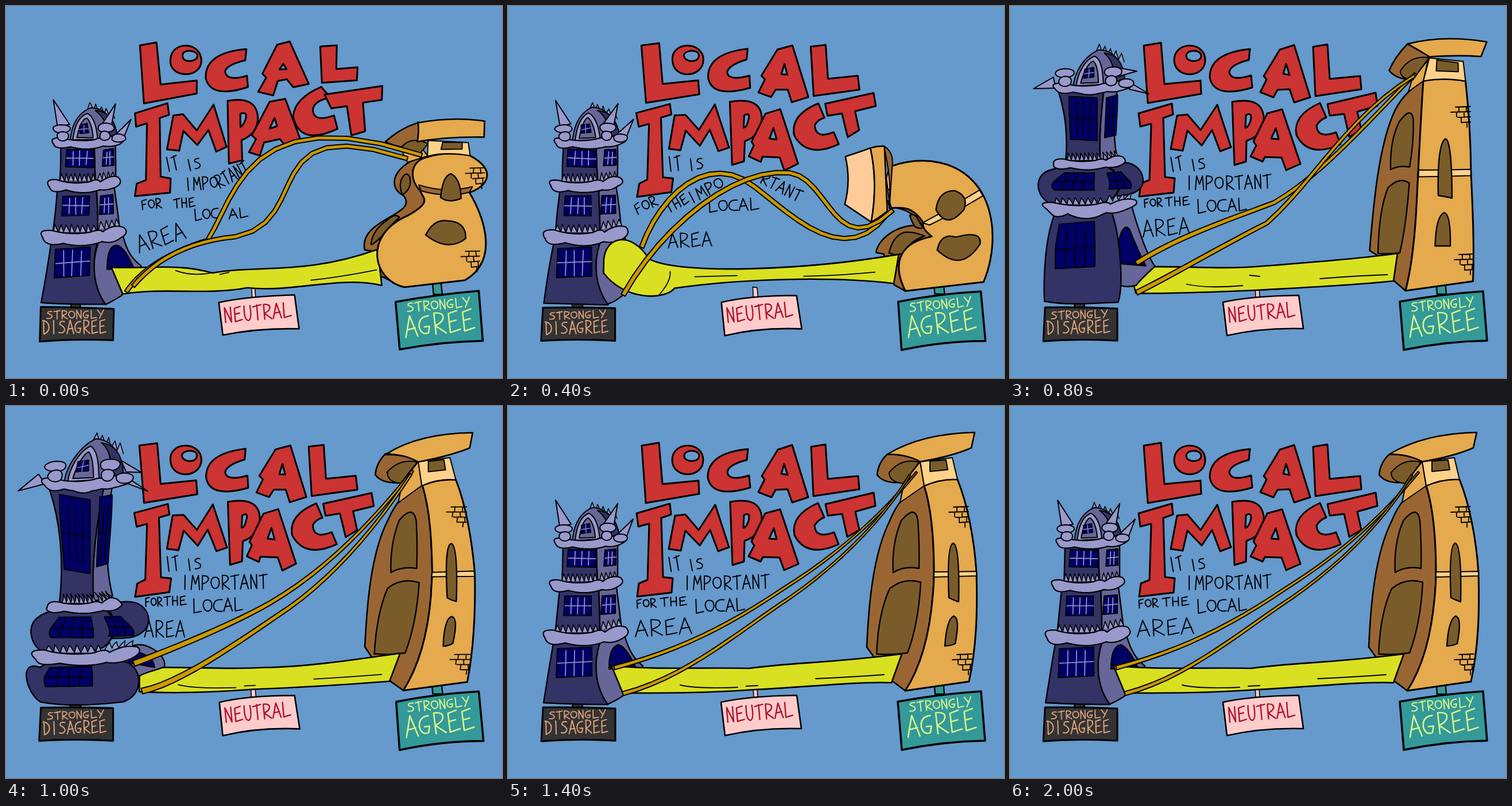
Animation of 864 by 648 pixels, one loop 2.1 s. Source, as an HTML page with a canvas:

```html
<!DOCTYPE html>
<html lang="en">
<head>
<meta charset="utf-8">
<title>Local Impact</title>
<style>
html, body { margin: 0; width: 864px; height: 648px; overflow: hidden; background: #69c; }
canvas { display: block; }
</style>
</head>
<body>
<canvas id="stage" width="864" height="648" role="img"
  aria-label="Local impact: it is important for the local area. Strongly disagree, neutral, strongly agree."></canvas>
<script>
const ctx = document.getElementById('stage').getContext('2d');
ctx.lineJoin = ctx.lineCap = 'round';

const NAVY = '#336', SLATE = '#669', LILAC = '#99c', NIGHT = '#006';
const ORANGE = '#e5a94e', BROWN = '#963', OLIVE = '#7a5c2b', CREAM = '#ffd28a', GOLD = '#c90';
const NUM = /-?\d+(\.\d+)?/g;
const STEP = 100, COUNT = 21, KEYS = [0, 4, 6, 10, 14];
let step = 0, wobble = 2;

const nums = s => (s.match(NUM) || []).map(Number);
const lerp = (a, b, t) => a + (b - a) * t;

// position on the key list: [index, fraction]
function keyAt() {
  let k = KEYS.length - 1;
  while (KEYS[k] > step) k--;
  return [k, k < KEYS.length - 1 ? (step - KEYS[k]) / (KEYS[k + 1] - KEYS[k]) : 0];
}
const pick = (list, k) => list[Math.min(k, list.length - 1)];
function near(list) {
  const [k, t] = keyAt();
  return pick(list, k + Math.round(t));
}
// blend matching number strings or paths
function pose(list) {
  const [k, t] = keyAt(), b = nums(pick(list, k + 1));
  let n = 0;
  return pick(list, k).replace(NUM, v => lerp(+v, b[n++], t).toFixed(2));
}

// hand-drawn wobble over three drawings
function boil(d) {
  const amp = [.8, .7, 0][wobble];
  let n = d.length;
  return d.replace(NUM, v => (+v + amp * Math.sin(n++ * 7.3 + wobble * 2.1)).toFixed(2));
}
function ink(d, fill, width = 2.4, color = '#000') {
  const path = new Path2D(d);
  if (fill) { ctx.fillStyle = fill; ctx.fill(path, 'evenodd'); }
  if (width) { ctx.lineWidth = width; ctx.strokeStyle = color; ctx.stroke(path); }
}
const paint = (d, ...style) => ink(boil(d), ...style);

// path to lists of points
function flatten(d) {
  const subs = [];
  let at;
  for (const [, cmd, args] of d.matchAll(/([MLQCZ])([^MLQCZ]*)/g)) {
    const n = nums(args), ctrl = [];
    for (let i = 0; i < n.length; i += 2) ctrl.push([n[i], n[i + 1]]);
    if (cmd === 'M') { at = ctrl[0]; subs.push([at]); continue; }
    const sub = subs.at(-1), all = [at, ...(cmd === 'Z' ? [sub[0]] : ctrl)];
    for (let s = 1; s <= 12; s++) {
      let p = all;
      while (p.length > 1) p = p.slice(1).map((q, i) => [lerp(p[i][0], q[0], s / 12), lerp(p[i][1], q[1], s / 12)]);
      sub.push(p[0]);
    }
    at = sub.at(-1);
  }
  return subs;
}
const toPath = subs => subs.map(s => 'M' + s.map(p => p[0].toFixed(1) + ' ' + p[1].toFixed(1)).join('L')).join('');
const ell = (x, y, a, b) =>
  `M${x - a} ${y}C${x - a} ${y - b * 1.33} ${x + a} ${y - b * 1.33} ${x + a} ${y}C${x + a} ${y + b * 1.33} ${x - a} ${y + b * 1.33} ${x - a} ${y}Z`;

// ---- lettering ----
const GLYPH = {
  A: 'M0 10L3.5 0L7 10M1.3 6.5L6 6', C: 'M7 1Q0 0 0 6Q1 10 7 9', D: 'M1 0L1 10Q8 8 6 3Q4 0 0 0',
  E: 'M6 0L1 1L1 10L7 9M1 5L5 4.5', F: 'M6 0L1 1L1 10M1 5L5 4.5', G: 'M6 1Q0 1 0 6Q1 10 5 9L6 6L3 6',
  H: 'M1 0L1 10M6 0L6 10M1 5L6 5', I: 'M3 0L3 10', L: 'M1 0L1 10L7 9', M: 'M0 10L1 0L3.5 6L6 0L7 10',
  N: 'M1 10L1 0L6 10L6 0', O: 'M3.5 1Q0 1 0 5Q1 9 4 9Q7 8 7 5Q7 1 3.5 1', P: 'M1 10L1 0Q7 0 6 3Q5 5 1 6',
  R: 'M1 10L1 0Q7 0 6 3Q5 5 1 6L7 10', S: 'M6 1Q1 0 1 3Q6 5 6 7Q5 10 0 9', T: 'M0 1L7 0M3.5 0L3.5 10',
  U: 'M1 0Q0 10 4 10Q7 9 6 0', Y: 'M0 0L3.5 5M7 0L2 10'
};
// place: start x y, end x y, height
function write(word, place, color = '#000', width = 2) {
  const [x0, y0, x1, y1, h] = nums(boil(place));
  const n = word.length, ang = Math.atan2(y1 - y0, x1 - x0) * 180 / Math.PI;
  const cell = Math.hypot(x1 - x0, y1 - y0) / n, path = new Path2D();
  [...word].forEach((ch, i) => path.addPath(new Path2D(GLYPH[ch]), new DOMMatrix()
    .translate(lerp(x0, x1, i / n), lerp(y0, y1, i / n)).rotate(ang)
    .scale(cell * .84 / 7, h / 10).translate(0, -10)));
  ctx.lineWidth = width;
  ctx.strokeStyle = color;
  ctx.stroke(path);
}

const WORDS = {
  IT: ['280 289 304 285 25'],
  IS: ['316 288 344 283 20'],
  IMPO: ['312 322 372 318 22', '320 346 380 313 20', '306 320 374 320 24'],
  RTANT: ['372 318 428 290 24', '439 308 508 342 20', '376 320 458 317 24'],
  FOR: ['236 355 274 352 17', '226 364 264 345 18', '224 352 260 350 15', '243 350 274 348 15', '224 352 260 350 15'],
  THE: ['292 352 332 350 16', '280 362 318 340 17', '266 349 314 347 15', '276 348 316 346 15', '266 349 314 347 15'],
  LOC: ['328 374 374 371 20', '350 360 403 357 21', '326 361 380 359 24'],
  AL: ['388 371 425 368 17', '403 357 440 354 20', '380 358 415 356 22'],
  AREA: ['232 430 318 404 30', '280 422 358 417 24', '222 402 318 391 30', '242 403 314 402 28', '222 402 324 396 28']
};

// letter paths: opening pose first where it differs
const TITLE = [
  ['M233 69L263 64L269 136L332 130L333 153L240 169Z'],
  [ell(313, 94, 27, 25) + ell(320, 87, 13, 9)],
  ['M418 75Q347 82 348 125Q356 162 422 142L420 121Q384 132 382 115Q384 102 416 94Z'],
  ['M472 68L495 62L527 135L500 142L490 128L473 130L465 156L440 150L453 124L446 118ZM477 111L483 100L488 110Z',
    'M470 76L495 68L523 159L495 168L487 145L466 146L459 159L436 150L447 128L442 122ZM476 118L481 101L487 120Z'],
  ['M547 71L577 69L575 109L612 107L612 130L550 133Z', 'M528 71L553 67L557 127L610 122L612 145L532 157Z'],
  ['M224 187L282 170L284 189L267 195L270 298L287 300L285 325L225 332L228 309L243 303L246 205L227 210Z'],
  ['M280 249L291 191L309 189L332 216L361 172L385 246L366 253L352 216L334 243L309 217L301 252Z'],
  ['M386 166Q436 156 438 192Q440 222 411 234L411 268L388 275ZM409 188Q421 182 417 198Q413 210 408 210Z',
    'M387 167Q440 157 442 195Q444 224 412 235L411 271L391 277ZM411 190Q423 184 419 200Q415 212 410 212Z'],
  ['M460 167L486 161L514 237L488 245L477 231L449 238L443 261L423 254L435 232L429 226ZM459 213L467 195L473 210Z',
    'M448 187L474 180L506 275L481 286L473 264L444 263L440 271L419 262L429 243L424 236ZM455 231L463 213L468 232Z'],
  ['M550 141Q502 160 500 193Q512 245 577 213L571 191Q536 204 534 180Q536 165 566 160Z',
    'M540 169Q492 190 499 225Q520 266 576 241L568 220Q535 232 534 208Q540 198 551 194Z'],
  ['M554 154L656 140L655 163L621 168L626 219L602 225L593 174L567 179Z',
    'M553 171L637 151L640 174L605 184L612 216L591 228L582 188L557 191Z']
];
function lettering() {
  for (const letter of TITLE) paint(pose(letter), '#c33', 3);
  for (const word in WORDS) write(word, pose(WORDS[word]));
}

// ---- left tower: details are bent by rows of "y centre scale" ----
const hold = (rest, squash, stretch) => [rest, rest, squash, stretch, rest];
const ROWS = [163, 235, 248, 288, 300, 322, 355, 385, 412, 450, 517];
const BENDS = hold(ROWS.map(y => y + ' 138 1').join(' '),
  '82 145 0.95 148 143 0.95 157 143 0.95 182 143 0.98 190 143 0.95 207 140 0.95 230 130 1.45 255 140 1 274 138 0.78 380 138 0.85 515 138 1',
  '40 148 1.15 132 134 1.25 148 130 1.1 322 133 0.85 338 140 0.95 358 140 1.15 395 141 1.65 420 142 1.3 448 140 1.2 475 140 1.4 516 138 1.1');
const CONES = [
  hold('M83 164L90 210L110 206Z', 'M60 140L95 130L92 150Z', 'M22 148L56 118L68 136Z'),
  hold('M191 170L167 205L184 210Z', 'M207 112L165 118L170 130Z', 'M235 115L200 95L210 115Z'),
  hold('M218 197L188 226L204 234Z', 'M238 158L200 138L203 155Z', 'M246 148L200 118L213 135Z')
];
const BASE_SIDE = hold(
  'M160 412C180 405 195 400 203 400C212 430 220 440 235 453C220 475 205 500 200 505C185 515 180 517 172 520C152 490 148 450 160 412Z',
  'M150 276C165 276 172 276 178 275C180 350 200 430 228 452C220 470 208 495 205 503C190 512 180 515 172 517C152 470 148 350 150 276Z',
  'M200 445C195 420 225 412 245 418C265 425 278 440 277 455C260 460 240 465 235 470C220 470 210 460 205 455C200 450 200 448 200 445Z');
const DOOR = hold('M176 458C176 435 180 418 193 416C205 420 215 440 222 454Z',
  'M166 450C155 380 162 320 172 345C182 390 200 430 215 450Z', 'M212 447C215 425 235 428 245 435C255 440 258 448 258 455Z');
const BASE = hold(
  'M80 408C74 440 68 480 62 517C100 519 140 520 174 520C152 490 148 450 160 412C130 412 100 410 80 408Z',
  'M95 272C98 380 82 470 60 514C100 520 140 514 172 517C152 470 148 350 150 276C130 272 110 272 95 272Z',
  'M60 455C20 440 35 500 60 515C110 525 170 520 205 515C245 500 235 450 205 445C170 425 90 435 60 455Z');
const MID_SIDE = hold(
  'M158 322C170 318 180 317 189 316C192 340 196 370 198 390C185 393 170 395 160 397C160 370 159 345 158 322Z',
  'M165 208C175 202 185 204 192 206C215 215 220 235 212 245C205 252 195 255 180 258C198 245 198 215 165 208Z',
  'M175 352C190 340 210 340 225 342C250 350 255 380 240 392C225 405 210 405 185 405C195 390 190 365 175 352Z');
const MID = hold(
  'M90 320C87 345 85 370 82 397C108 397 134 397 160 397C160 370 159 345 158 320C135 318 110 320 90 320Z',
  'M75 208C45 215 48 255 85 262C120 270 160 262 180 255C198 245 198 215 165 208C130 200 100 204 75 208Z',
  'M60 365C30 380 45 425 70 430C110 435 150 430 170 420C195 400 195 370 170 352C130 345 90 350 60 365Z');
const TOP_SIDE = hold(
  'M154 246C166 244 180 242 191 240C191 262 191 285 191 306C180 308 165 308 156 309C155 290 154 265 154 246Z',
  'M155 156C166 156 180 155 188 154C188 168 187 180 186 192C178 195 170 195 162 195C162 182 158 170 155 156Z',
  'M174 122C180 122 185 122 189 122C175 180 170 270 186 330C178 334 165 338 152 340C148 270 160 190 174 122Z');
const TOP = hold(
  'M96 244C95 265 95 290 94 309C115 310 135 310 156 309C155 290 154 265 154 246C135 242 115 242 96 244Z',
  'M94 154C98 170 100 180 102 194C125 196 145 196 162 195C162 182 158 170 155 156C135 152 115 152 94 154Z',
  'M74 142C95 200 102 270 92 347C115 345 135 342 152 340C148 270 160 190 174 122C140 125 100 130 74 142Z');

function bender() {
  const r = nums(pose(BENDS));
  return ([x, y]) => {
    let j = 0;
    while (j < ROWS.length - 2 && y >= ROWS[j + 1]) j++;
    const f = (y - ROWS[j]) / (ROWS[j + 1] - ROWS[j]);
    const c = Math.min(1, Math.max(0, f)), e = c * c * (3 - 2 * c), a = j * 3;
    return [lerp(r[a + 1], r[a + 4], e) + (x - 138) * lerp(r[a + 2], r[a + 5], e), lerp(r[a], r[a + 3], f)];
  };
}
function leftTower() {
  const bend = bender();
  const put = (d, fill, w = 2, color) => ink(toPath(flatten(boil(d)).map(s => s.map(bend))), fill, w, color);
  const bars = step < 6 || step > 12 ? LILAC : '#000';
  const pane = (x, y, w, h, dy, cols) => {
    put(`M${x} ${y}L${x + w} ${y + dy}L${x + w} ${y + h + dy}L${x - 2} ${y + h}Z`, NIGHT);
    let d = `M${x} ${y + h / 2}L${x + w} ${y + h / 2 + dy}`;
    for (let i = 1; i < cols; i++) d += `M${x + w * i / cols} ${y + 3}L${x + w * i / cols - 1} ${y + h - 3}`;
    put(d, null, 1.7, bars);
  };
  const teeth = (x0, y0, x1, y1, n, h) => {
    let d = `M${x0} ${y0}`;
    for (let i = 0; i < n; i++)
      d += `L${lerp(x0, x1, (i + .4) / n)} ${lerp(y0, y1, (i + .5) / n) - h}L${lerp(x0, x1, (i + 1) / n)} ${lerp(y0, y1, (i + 1) / n)}`;
    put(d, LILAC, 1.6);
  };
  const cloud = (x, y, w, h) => {
    const p = (a, b) => `${x + a * w} ${y + b * h}`;
    put(`M${p(.03, .65)}Q${p(-.04, .2)} ${p(.13, .25)}Q${p(.35, .55)} ${p(.58, .35)}Q${p(.68, .15)} ${p(.72, .35)}` +
      `Q${p(.85, -.1)} ${p(.96, .1)}Q${p(1.03, .4)} ${p(.93, .65)}Q${p(.83, .95)} ${p(.71, .85)}` +
      `Q${p(.5, 1.2)} ${p(.26, .9)}Q${p(.06, 1.15)} ${p(.03, .65)}Z`, LILAC, 2.2);
  };

  paint(pose(BASE_SIDE), SLATE);
  paint(pose(DOOR), NIGHT);
  paint(pose(BASE), NAVY);
  pane(86, 423, 60, 50, -3, 4);
  paint(pose(MID_SIDE), near(hold(SLATE, NAVY, NAVY)));
  paint(pose(MID), NAVY);
  pane(99, 331, 46, 34, 0, 4);
  pane(164, 331, 23, 32, -2, 3);
  teeth(82, 394, 158, 394, 8, 13);
  teeth(162, 389, 198, 383, 4, 13);
  cloud(60, 382, 151, 34);
  paint(pose(TOP_SIDE), SLATE);
  paint(pose(TOP), NAVY);
  pane(105, 250, 48, 30, 1, 4);
  pane(169, 251, 19, 28, -2, 3);
  teeth(94, 305, 156, 305, 8, 13);
  teeth(160, 303, 190, 300, 4, 12);
  cloud(71, 296, 130, 28);

  teeth(143, 178, 190, 196, 5, 12);
  put('M112 238Q115 190 147 177Q186 178 196 236Z', SLATE);
  put('M156 182Q180 200 176 236L195 236Q192 186 156 182Z', NAVY);
  put('M117 234Q121 194 141 187Q157 195 160 232Z', LILAC);
  put('M124 230Q130 197 140 195Q150 204 152 229Z', SLATE);
  put('M128 208L142 205L144 220L128 222Z', NIGHT);
  put('M135 207L136 221M128 215L143 213', null, 1.3, LILAC);
  CONES.forEach(c => paint(pose(c), LILAC, 2));
  cloud(79, 224, 128, 24);
  [[97, 214, 15, 7], [99, 227, 10, 8], [174, 212, 14, 8], [172, 226, 9, 8], [196, 230, 12, 7]]
    .forEach(b => put(ell(...b), LILAC));
}

// ---- right tower ----
const LEFT_EDGE = [
  'C640 480 620 400 700 364C745 340 725 335 722 322C700 300 705 270 735 262Z',
  'C665 440 690 410 738 402C725 390 722 385 722 376C705 350 690 350 665 352Z',
  'C680 450 678 390 678 330C678 320 679 300 680 290C686 230 695 180 715 122Z',
  'C722 450 735 390 740 330C741 320 742 300 742 290C742 230 738 180 725 139Z'];
const FRONT = [
  'M735 262Q765 254 808 260C855 285 840 315 808 325C825 355 865 440 800 478L694 489',
  'M665 352Q664 315 668 278C720 262 790 265 825 325C850 370 850 430 828 480L692 497',
  'M715 122Q760 122 804 134C798 190 793 240 790 290C794 350 802 420 810 479L686 496',
  'M725 139Q755 126 783 128C800 170 812 230 816 290C818 360 816 420 803 480L692 496'
].map((d, i) => d + LEFT_EDGE[i]);
const SIDE = [
  'M735 262C690 265 655 310 692 330C720 365 615 370 624 424L640 428L652 470L694 489',
  'M665 352C690 350 715 365 722 385C690 375 645 400 641 430L655 432L672 485L692 497',
  'M715 122C690 145 675 165 668 182C650 240 640 320 628 432L650 436L668 478L686 496',
  'M725 139C690 150 675 175 665 200C635 260 628 350 625 420L638 438L668 478L692 496'
].map((d, i) => d + LEFT_EDGE[i]);
const ARCHES = [[
  'M690 328Q684 310 690 298Q698 288 704 298Q706 312 699 322Q695 327 690 328Z',
  'M700 365Q705 360 712 368Q718 378 722 385Q720 390 710 385Q702 375 700 365Z',
  'M655 280Q655 230 670 205Q688 175 691 195Q690 240 676 278Q665 276 655 280Z',
  'M671 290Q668 240 685 200Q710 170 714 200Q717 240 716 283Q690 278 671 290Z'], [
  'M636 415Q640 390 660 375Q678 360 686 368Q665 385 658 398Q645 412 636 415Z',
  'M664 430Q670 400 690 395Q705 392 725 400Q700 410 690 430Q675 436 664 430Z',
  'M640 430Q640 350 652 315Q668 295 672 310Q666 380 662 430Q650 431 640 430Z',
  'M642 432Q645 360 665 318Q690 298 719 307Q715 380 696 430Q670 434 642 432Z']];
const SLITS = [[
  'M757 333Q760 295 776 293Q792 300 792 335Q772 345 757 333Z',
  'M745 355Q750 322 778 321Q802 330 795 355Q765 390 745 355Z',
  'M724 326Q724 245 740 224Q752 215 755 328Q740 326 724 326Z',
  'M768 334Q764 240 776 239Q787 245 785 341Q776 338 768 334Z'], [
  'M731 398Q745 370 770 375Q802 375 800 405Q770 430 731 398Z',
  'M747 425Q755 395 780 402Q825 390 823 415Q790 465 747 425Z',
  'M720 418Q720 360 736 354Q748 355 755 422Q738 418 720 418Z',
  'M761 418Q764 372 776 366Q788 368 779 414Q770 418 761 418Z']];
const BAND = [
  'M720 312Q765 326 812 315L808 325Q765 334 722 322Z', 'M722 377Q770 352 822 321L827 330Q775 362 735 382Z',
  'M682 282Q735 283 790 281L789 295Q735 297 681 297Z', 'M742 289Q780 289 816 288L816 296Q780 297 742 298Z'];
const NECK = [
  'M735 235L806 238L808 260Q765 254 735 262Z', 'M660 300L662 285L668 278Q664 315 665 352Z',
  'M743 84L805 103L804 134Q760 122 715 122Z', 'M718 97L774 90L783 128Q755 126 725 139Z'];
const NECK_SIDE = [
  'M718 240L735 262L700 272L690 255Z', 'M662 340L665 352L668 352L664 340Z',
  'M738 92L715 122L705 130L712 120Z', 'M718 97L725 139L683 168L690 133Z'];
const HATCH = [
  'M760 237L795 238L795 249L757 249Z', 'M664 320L665 320L665 321L664 321Z',
  'M752 92L798 104L796 118L750 112Z', 'M735 96L763 94L766 111L735 114Z'];
const CAP = [
  'M718 203Q780 193 834 200L832 228Q770 228 717 236Q719 220 718 203Z',
  'M632 248Q644 243 655 244L661 358Q645 370 632 376Q645 310 632 248Z',
  'M724 48Q790 52 848 79L834 103Q790 82 744 80Q730 70 724 48Z',
  'M661 84Q720 48 813 46L807 73Q772 88 718 97Q695 84 661 84Z'];
const CAP_SIDE = [
  'M718 203Q690 212 661 236Q680 246 715 250L717 236Q719 220 718 203Z',
  'M632 248Q610 255 587 262Q598 305 587 345L632 376Q645 310 632 248Z',
  'M724 48Q695 80 678 105Q690 120 715 124L744 80Q730 70 724 48Z',
  'M661 84Q645 98 643 120Q655 136 688 133L718 96Q695 84 661 84Z'];
const CAP_UNDER = [
  'M690 246Q705 225 735 240L718 262Q695 255 690 246Z', 'M655 244Q672 255 670 280L664 352Q668 300 655 244Z',
  'M696 110Q710 80 744 82L715 122Q696 122 696 110Z', 'M664 116Q685 90 716 98L688 135Q664 132 664 116Z'];

function bricks(x, y) {
  let d = '';
  for (let r = 0; r < 4; r++) {
    const s = x + [8, 0, 12, 18][r], yy = y + r * 9;
    d += `M${s} ${yy}L${x + 34} ${yy - 1}`;
    for (let b = s + 6 + r % 2 * 4; b < x + 32; b += 13) d += `M${b} ${yy}L${b} ${yy + 8}`;
  }
  paint(d, null, 1.8);
}
function rightSide() {
  paint(pose(SIDE), BROWN, 2.6);
  ARCHES.forEach(a => paint(pose(a), OLIVE));
}
function rightFront() {
  paint(pose(FRONT), ORANGE, 3);
  paint(pose(BAND), near([BROWN, CREAM]), 2);
  SLITS.forEach(s => paint(pose(s), OLIVE));
  paint(pose(NECK_SIDE), ORANGE, 2);
  paint(pose(NECK), CREAM, 2);
  paint(pose(HATCH), OLIVE, 2);
  paint(pose(CAP_SIDE), near([BROWN, '#fc9', BROWN]), 2.6);
  paint(pose(CAP_UNDER), near([OLIVE, BROWN, OLIVE]), 2);
  paint(pose(CAP), ORANGE, 2.6);
  if (step < 2) { bricks(800, 283); bricks(792, 428); }
  if (step > 7) { bricks(768, 176); bricks(774, 433); }
}

// ---- deck and cables ----
const DECK = [
  'M184 455C240 458 300 448 360 465C440 450 520 470 648 424L654 486C580 470 500 500 420 490C350 505 270 490 203 501Z',
  'M166 450C165 400 215 390 245 440C300 470 520 460 680 432L672 484C560 470 400 475 290 492C270 515 200 510 166 465Z',
  'M182 455C260 448 340 460 420 452C500 440 600 440 664 432L668 478C600 488 500 492 430 496C350 497 270 503 207 503Z',
  'M232 456C300 453 380 460 450 455C530 455 620 440 686 430L668 480C600 485 500 490 430 494C350 500 290 500 232 498Z',
  'M180 452C240 460 350 455 420 457C510 445 540 450 686 432L668 482C600 480 520 490 430 494C350 500 270 500 200 500Z'];
const FOLDS = [
  'M295 460Q325 472 360 465M388 463L372 468M532 478Q580 472 645 460',
  'M262 505Q285 480 282 462M325 472L400 470M515 470Q570 470 640 464',
  'M315 483Q350 492 410 484M420 450L435 455M544 475Q600 468 660 468',
  'M300 486Q330 493 400 490M415 488L435 487M536 475Q600 472 655 468'];
const CABLES = [[
  'M210 498C240 450 300 425 352 408C400 330 420 160 725 260', 'M232 420C265 330 350 250 430 315C500 370 590 460 662 360',
  'M218 448C280 385 380 360 460 343C530 300 600 210 705 124', 'M222 448C300 420 400 378 460 342C560 285 640 200 708 112',
  'M185 456C300 425 380 385 480 318C580 255 650 190 712 115'], [
  'M222 488C260 440 320 410 400 402C540 375 430 180 700 266', 'M200 503C270 380 400 280 490 290C560 300 570 450 670 355',
  'M205 503C270 450 340 420 425 390C500 300 540 160 705 124', 'M236 496C300 485 400 415 470 366C560 310 640 220 705 118',
  'M200 501C300 475 380 410 470 348C560 290 650 205 700 120']];
const WIDTHS = ['7 7', '8 7', '7 6', '10 4', '7 3'];

function deck() {
  paint(pose(DECK), '#d9e021', 2.6);
  paint(pose(FOLDS), null, 1.8);
}
// tapering ribbon along a path
function cable(d) {
  const pts = flatten(boil(d))[0], [w0, w1] = nums(pose(WIDTHS)), last = pts.length - 1;
  const edge = side => pts.map(([x, y], i) => {
    const a = pts[Math.max(0, i - 1)], b = pts[Math.min(last, i + 1)];
    const ang = Math.atan2(b[1] - a[1], b[0] - a[0]), w = side * lerp(w0, w1, i / last) / 2;
    return [x - Math.sin(ang) * w, y + Math.cos(ang) * w];
  });
  ink(toPath([[...edge(1), ...edge(-1).reverse()]]) + 'Z', GOLD, 2);
}

// ---- signs ----
function posts() {
  paint('M112 510L129 510L130 530L113 530Z', '#333');
  paint('M427 490L434 490L435 508L428 508Z', '#fcc', 1.6);
  paint('M742 478L758 478L760 502L744 502Z', '#399');
}
function signs() {
  paint('M61 525Q120 524 187 527L187 583Q120 579 58 584Z', '#333', 3);
  write('STRONGLY', '72 546 172 543 14', '#e0a27c', 1.8);
  write('DISAGREE', '65 572 176 569 23', '#e0a27c');
  paint('M371 516Q420 505 503 504L511 562Q440 560 378 574Z', '#fcc', 2.6);
  write('NEUTRAL', '381 551 499 541 26', '#b0122c', 2.4);
  paint('M679 515Q750 502 824 497L831 583Q760 584 686 599Z', '#399', 3.5);
  write('STRONGLY', '700 533 810 523 17', '#d6f58a', 2);
  write('AGREE', '697 577 820 563 37', '#d6f58a', 2.6);
}

function draw() {
  ctx.fillStyle = '#69c';
  ctx.fillRect(0, 0, 864, 648);
  lettering();
  posts();
  // the stretched tower hides the end of the deck
  const behind = near(hold(false, false, true));
  if (behind) { rightSide(); deck(); }
  leftTower();
  if (!behind) { rightSide(); deck(); }
  rightFront();
  CABLES.forEach(c => cable(pose(c)));
  signs();
}
let shown = -1;
function tick() {
  step = Math.floor(performance.now() / STEP) % COUNT;
  wobble = step % 3;
  if (step !== shown) { shown = step; draw(); }
  requestAnimationFrame(tick);
}
tick();
</script>
</body>
</html>
```
